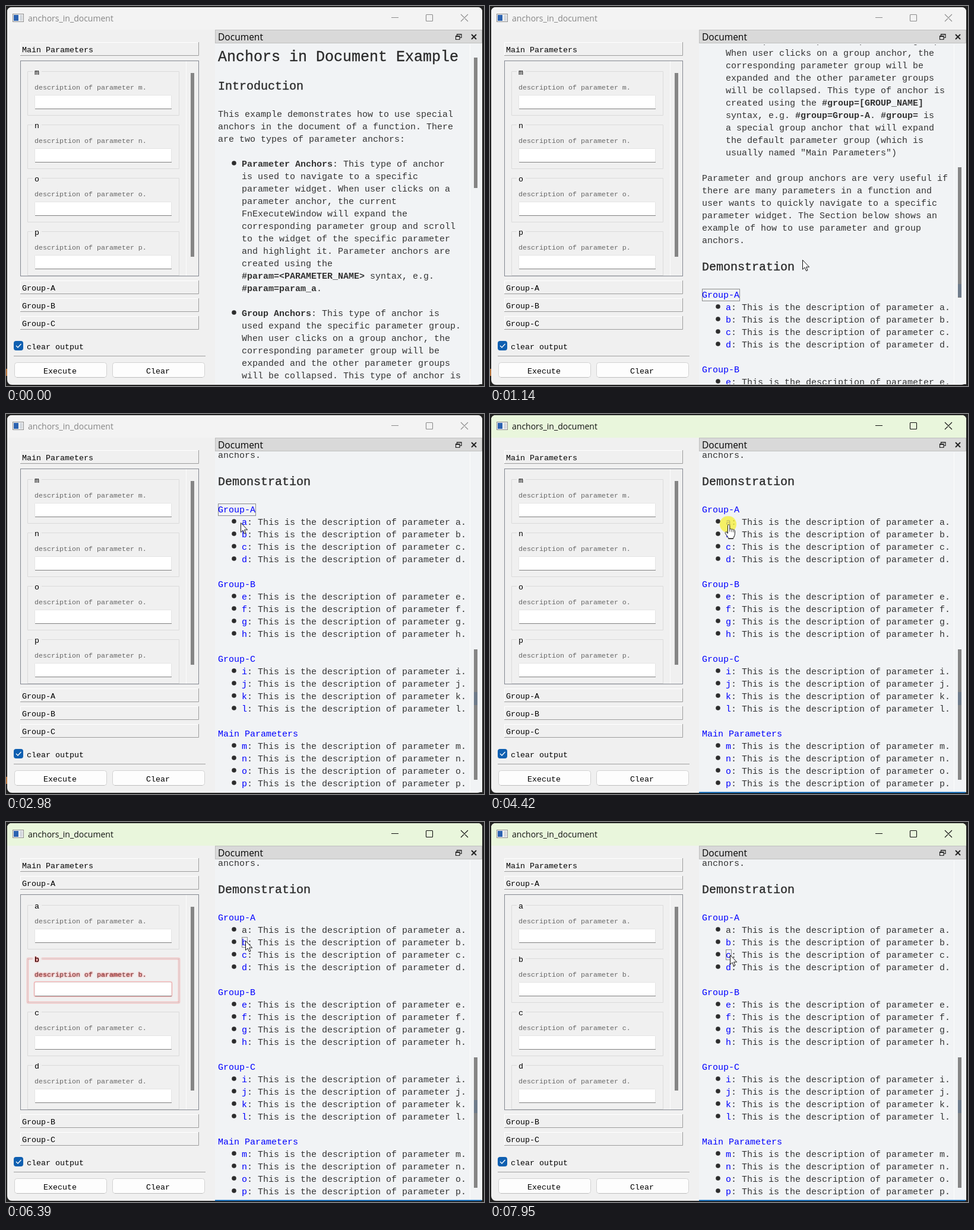
An HTML page for the animation above (8 s loop, 805 by 641 pixels).

```html
<!DOCTYPE html>
<html lang="en">
<head>
<meta charset="utf-8">
<title>anchors_in_document</title>
<style>
html, body { margin: 0; width: 100%; height: 100%; overflow: hidden; background: #1f1f1f; }
svg { display: block; }
text { white-space: pre; font-family: "Liberation Mono", monospace; fill: #000; }
.ui { font-family: "Open Sans", "Noto Sans", sans-serif; }
.title { font-size: 14px; fill: #868686; }
.dock { font-size: 15.55px; }
.label { font-size: 13.333px; }
.desc { font-size: 11.667px; fill: #666; }
.body { font-size: 15px; fill: #333; }
.h1 { font-size: 25px; fill: #2b2b2b; stroke: #2b2b2b; stroke-width: .35px; }
.h2 { font-size: 20px; fill: #2b2b2b; stroke: #2b2b2b; stroke-width: .35px; }
.b { font-weight: bold; }
.link { fill: #00f; }
.btn { fill: none; stroke: #8c8c8c; stroke-width: 1.1; }
.active .btn { stroke: #111; }
.active .title { fill: #111; }
.dots { fill: none; stroke: #222; stroke-dasharray: 1 1; }
</style>
</head>
<body>
<svg id="stage" width="805" height="641" viewBox="0 0 805 641"></svg>
<script>
const LOOP = 8000;
const ROW = 21;

// ---- timing helpers: times in ms become percentages of the loop ----
let css = '', count = 0;
function anim(sel, steps, ease = 'step-end') {
  const name = 'k' + count++;
  const frames = steps.map(([t, d]) => `${t / LOOP * 100}%{${d}}`).join('');
  css += `@keyframes ${name}{${frames}}${sel}{animation:${name} ${LOOP}ms ${ease} -15ms infinite}`;
}
function show(sel, ...spans) {
  const steps = spans[0][0] > 0 ? [[0, 'opacity:0']] : [];
  for (const [from, to] of spans) {
    steps.push([from, 'opacity:1']);
    if (to < LOOP) steps.push([to, 'opacity:0']);
  }
  anim(sel, steps);
}
const move = (x, y, extra = '') => `transform:translate(${x}px,${y}px);${extra}`;

// ---- drawing helpers ----
const text = (x, y, cls, s) =>
  `<text x="${x}" y="${y}" class="${cls}">${s.replace(/\*(.+?)\*/g, '<tspan class="b">$1</tspan>')}</text>`;
const rect = (x, y, w, h, fill, more = '') =>
  `<rect x="${x}" y="${y}" width="${w}" height="${h}" fill="${fill}" ${more}/>`;
const line = (d, color, w = 1) => `<path d="${d}" fill="none" stroke="${color}" stroke-width="${w}"/>`;

function titleBar(cls, fill) {
  return `<g class="${cls}">
    <path d="M2 40V10Q2 2 10 2H794Q802 2 802 10V40Z" fill="${fill}"/>
    ${rect(11.5, 13.5, 18, 13, '#f4f4f4', 'stroke="#8f8f8f"')}
    ${rect(13, 15, 8, 10, '#2b62b0')}${rect(23, 15, 5, 10, '#d5d9de')}
    ${text(37, 25.5, 'ui title', 'anchors_in_document')}
    <path class="btn" d="M649 19.5H661M707.5 15.5q0 -1 1 -1h9q1 0 1 1v9q0 1 -1 1h-9q-1 0 -1 -1zM766 14L778 26M778 14L766 26"/>
  </g>`;
}

function header(y, name) {
  return rect(24, y, 301, 23, '#f0f0f0') +
    line(`M24.5 ${y + 23}V${y + .5}H325`, '#fff') +
    line(`M24 ${y + 22.5}H324.5V${y}`, '#9c9c9c') +
    text(27, y + 17, 'label', name);
}

function param(id, y) {
  return `<g id="param-${id}">
    ${line(`M60 ${y + .5}H291.5V${y + 74.5}H36.5V${y + .5}H45`, '#dadada')}
    ${text(48, y + 6, 'label', id)}
    ${text(48, y + 31, 'desc', `description of parameter ${id}.`)}
    ${rect(48.5, y + 40.5, 230, 23, '#fff', 'rx="1" stroke="#e4e4e4"')}
    ${line(`M49 ${y + 63.5}H279`, '#808080')}
  </g>`;
}

function panel(y, ids) {
  const params = [...ids].map((id, i) => param(id, y + 18 + i * 90)).join('');
  return rect(24.5, y + .5, 300, 363, '#f0f0f0', 'stroke="#838790"') +
    line(`M303.5 ${y + 1}V${y + 363}`, '#fbfbfb') +
    rect(311, y + 21, 6, 310, '#858585') + params;
}

function button(x, tx, s) {
  return rect(x + .5, 601.5, 155, 25, '#fdfdfd', 'rx="4" stroke="#d2d2d2"') +
    line(`M${x + 4} 626.5H${x + 152}`, '#bdbdbd') + text(tx, 620, 'label', s);
}

// ---- document content ----
const bullet = y => `<circle cx="384" cy="${y}" r="3.8" fill="#2d2d2d"/>`;
const block = (x, y, lines) =>
  lines.map((s, i) => text(x, y + 6 + i * ROW, 'body', s)).join('');

function linkGroup(name, ids, i) {
  const y = 967 + i * 126;
  const items = [...ids].map((id, j) => {
    const cy = y + ROW * (j + 1);
    return bullet(cy) + `<text x="397" y="${cy + 6}" class="body"><tspan class="link" id="link-${id}">${id}</tspan>: This is the description of parameter ${id}.</text>`;
  });
  return text(357, y + 6, 'body link', name) + items.join('');
}

const focus = (id, x, y, w, h) => `<rect id="focus-${id}" class="dots" x="${x}" y="${y}" width="${w}" height="${h}"/>`;

const groups = [['Group-A', 'abcd'], ['Group-B', 'efgh'], ['Group-C', 'ijkl'], ['Main Parameters', 'mnop']];

const docText = text(357, 93, 'h1', 'Anchors in Document Example') +
  text(357, 141, 'h2', 'Introduction') +
  block(357, 181, [
    'This example demonstrates how to use special',
    'anchors in the document of a function. There',
    'are two types of parameter anchors:']) +
  bullet(265) + block(397, 265, [
    '*Parameter Anchors*: This type of anchor',
    'is used to navigate to a specific',
    'parameter widget. When user clicks on a',
    'parameter anchor, the current',
    'FnExecuteWindow will expand the',
    'corresponding parameter group and scroll',
    'to the widget of the specific parameter',
    'and highlight it. Parameter anchors are',
    'created using the',
    '*#param=&lt;PARAMETER_NAME&gt;* syntax, e.g.',
    '*#param=param_a*.']) +
  bullet(517) + block(397, 517, [
    '*Group Anchors*: This type of anchor is',
    'used expand the specific parameter group.',
    'When user clicks on a group anchor, the',
    'corresponding parameter group will be',
    'expanded and the other parameter groups',
    'will be collapsed. This type of anchor is',
    'created using the *#group=[GROUP_NAME]*',
    'syntax, e.g. *#group=Group-A*. *#group=* is',
    'a special group anchor that will expand',
    'the default parameter group (which is',
    'usually named "Main Parameters")']) +
  block(357, 770, [
    'Parameter and group anchors are very useful if',
    'there are many parameters in a function and',
    'user wants to quickly navigate to a specific',
    'parameter widget. The Section below shows an',
    'example of how to use parameter and group',
    'anchors.']) +
  text(357, 927, 'h2', 'Demonstration') +
  groups.map(([name, ids], i) => linkGroup(name, ids, i)).join('') +
  focus('group', 357.5, 958.5, 63, 20) +
  [...'abc'].map((id, i) => focus(id, 397.5, 980.5 + i * ROW, 9, 17)).join('');

// ---- scene ----
document.getElementById('stage').innerHTML = `
<defs>
  <clipPath id="view"><rect x="353" y="65" width="428" height="573"/></clipPath>
  <clipPath id="low"><rect x="24" y="92" width="301" height="364"/></clipPath>
  <clipPath id="high"><rect x="24" y="122" width="301" height="364"/></clipPath>
</defs>
${rect(0, 0, 805, 641, '#202020')}
<g id="edge">${rect(0, 612, 2, 12, '#b8743a')}</g>
${rect(2, 2, 800, 637, '#f0f0f0', 'rx="8"')}
${titleBar('', '#f3f3f3')}
${titleBar('active', '#e9f6dc')}

${header(61, 'Main Parameters')}
<g id="main">
  <g clip-path="url(#low)">${panel(92, 'mnop')}</g>
  ${header(463, 'Group-A')}
</g>
<g id="groupA">
  ${header(91, 'Group-A')}
  <g clip-path="url(#high)">${panel(122, 'abcd')}</g>
</g>
${header(493, 'Group-B')}${header(523, 'Group-C')}

${rect(13, 565, 16, 16, '#0f5fb0', 'rx="4"')}
${line('M17 573L20 576L25.5 570', '#fff', 1.3)}
${text(35, 579, 'label', 'clear output')}
${line('M13 590.5H336', '#a0a0a0')}
${button(14, 63, 'Execute')}${button(179, 236, 'Clear')}

${rect(352.5, 40.5, 449, 22, '#d9d9d9', 'stroke="#bfbfbf"')}
${text(357, 58, 'ui dock', 'Document')}
${line('M759.5 50V47.5H767V53.5H764.5M757.5 50.5H764V56.5H757.5ZM757 51.5H764M759 48H767', '#222', 1.2)}
${line('M784 48L792 56M792 48L784 56', '#222', 1.9)}
${rect(352, 63, 450, 575, '#f1f3f5')}
${line('M781.5 65V638', '#fcfcfc')}
<g clip-path="url(#view)"><g id="doc">${docText}</g></g>
<g id="thumb">${rect(788, 87, 6, 220, '#858585')}</g>
<g id="patch">${rect(788, 469, 6, 22, '#6e7b8a')}</g>
<g id="accent">${rect(352, 637.5, 449, 1.8, '#0067c0')}</g>

<g id="cursor">
  <circle id="press" r="14" cx="0" cy="-.5" fill="#f6ef3c" opacity="0"/>
  <path id="arrow" d="M.5 .5V16.3L4 13L6.6 18.8L9 17.8L6.5 12.2H11.6Z" fill="#fff" stroke="#111"/>
  <g id="hand" stroke="#111" stroke-linejoin="round">
    <path fill="#fff" d="M-.6 2C-.6 -.4 2.8 -.4 2.8 2V8C3.2 6.8 5.8 6.9 6 8.6C6.4 7.5 8.8 7.8 9 9.4C9.5 8.5 11.4 8.9 11.4 10.6V15.5C11.4 19 9 21 8.6 23.5H.6C.2 21 -3 18.2 -4.8 14.6C-5.3 12.6 -3.4 11.8 -2.2 13.2L-.6 15Z"/>
    <path fill="none" stroke-width=".8" d="M2.8 8V12M6 9V12.5M9 10V13"/>
  </g>
</g>`;

// ---- motion ----
const scroll = [[0, 0], [800, 160], [870, 321], [1140, 481], [1210, 641], [1280, 802], [1680, 807]];
anim('#doc', scroll.map(([t, y]) => [t, move(0, -y)]));
anim('#thumb', scroll.map(([t, y]) => [t, move(0, Math.round(y * .3845))]));
show('#patch', [1140, LOOP]);

// window gains focus on the first press
anim('.active', [[0, 'opacity:0'], [4140, 'opacity:0'], [4340, 'opacity:1'], [LOOP, 'opacity:1']], 'linear');
show('#accent', [4140, LOOP]);
show('#edge', [0, 4140]);

show('#main', [0, 4490]);
show('#groupA', [4490, LOOP]);
show('#focus-group', [0, 4140]);
show('#focus-a', [4490, 5580]);
show('#focus-b', [5920, 7260]);
show('#focus-c', [7400, LOOP]);
anim('#link-a', [[0, 'fill:#00f'], [5580, 'fill:#333']]);

const glow = (r, a) =>
  `filter:drop-shadow(0 0 ${r / 2}px rgba(255,0,0,${a})) drop-shadow(0 0 ${r}px rgba(255,0,0,${a}))`;
for (const [id, start, end] of [['a', 4490, 5050], ['b', 5920, 6460], ['c', 7400, 7950]]) {
  const none = 'filter:none';
  anim('#param-' + id, [
    [0, none], [start, none + ';animation-timing-function:step-end'],
    [start + 1, glow(.3, .7)], [start + 200, glow(.4, .7)],
    [end - 1, glow(1.2, .8)], [end, none], [LOOP, none]], 'linear');
}

const ease = 'animation-timing-function:ease-in-out';
anim('#cursor', [
  [0, move(808, 552)], [50, move(808, 552, 'animation-timing-function:ease-out')],
  [330, move(526, 428)], [1679, move(526, 428)], [1680, move(526, 430)],
  [1750, move(526, 430)], [1880, move(510, 441)],
  [2220, move(510, 441, ease)], [3050, move(394, 181)], [3140, move(395, 181)],
  [3280, move(395, 181)], [3410, move(401, 186.5)],
  [5250, move(401, 186.5)], [5380, move(403, 200)],
  [6590, move(403, 200, ease)], [7000, move(404, 224)], [LOOP, move(404, 224)]], 'linear');

show('#hand', [3380, 4560], [5330, 5990], [6720, 7460]);
show('#arrow', [0, 3380], [4560, 5330], [5990, 6720], [7460, LOOP]);
anim('#press', [[0, 'opacity:0'],
  ...[[4140, 4490], [5580, 5920], [7260, 7400]].flatMap(([a, b]) => [[a, 'opacity:.78'], [b, 'opacity:0']])]);

const sheet = document.createElement('style');
sheet.textContent = css;
document.head.append(sheet);
</script>
</body>
</html>
```
